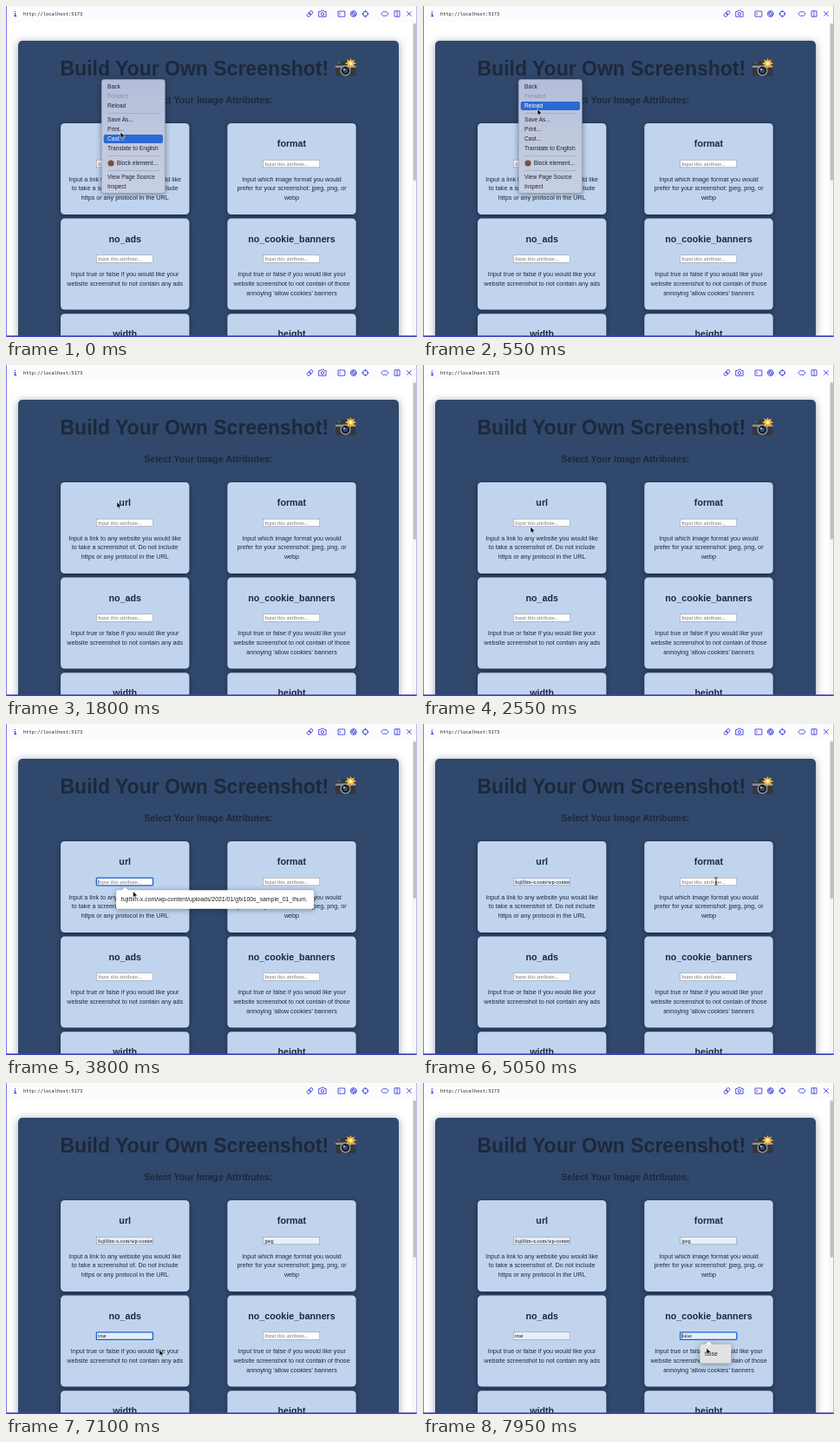
Recreate the animation shown at these times as an HTML page. Size 474x381 px, loop 8 s.

```html
<!DOCTYPE html>
<html lang="en">
<head>
<meta charset="utf-8">
<title>Screenshot builder</title>
<style>
  html, body { margin: 0; width: 100%; height: 100%; overflow: hidden; background: #fff; }
  svg { display: block; width: 474px; height: 381px; }
  text { font-family: "Liberation Sans", Arial, sans-serif; white-space: pre; }
  .mono { font-family: "DejaVu Sans Mono", monospace; font-size: 5.4px; fill: #222; }
  .heading { font-weight: bold; font-size: 10.7px; fill: #1c293b; text-anchor: middle; }
  .body { font-size: 7.2px; fill: #1c293b; text-anchor: middle; }
  .value { font-family: "Liberation Serif", "Times New Roman", serif; font-size: 6.2px; }
  .menu { font-size: 6.67px; }
  .panel { filter: drop-shadow(0 1px 5px #0c1f4466); }
  .card { filter: drop-shadow(0 1px 2.5px #0a142899); }
  .float { filter: drop-shadow(0 1px 3px #0006); }
  .icon { fill: none; stroke: #2b2bd6; stroke-width: .8; }
</style>
</head>
<body>
<svg id="stage" viewBox="0 0 474 381"></svg>
<script>
const LOOP = 8000;
const ROW_STEP = 109.6;
const PLACEHOLDER = 'Input this attribute...';

const cards = [
  { title: 'url', lines: ['Input a link to any website you would like', 'to take a screenshot of. Do not include', 'https or any protocol in the URL'] },
  { title: 'format', lines: ['Input which image format you would', 'prefer for your screenshot: jpeg, png, or', 'webp'] },
  { title: 'no_ads', lines: ['Input true or false if you would like your', 'website screenshot to not contain any ads'] },
  { title: 'no_cookie_banners', lines: ['Input true or false if you would like your', 'website screenshot to not contain of those', "annoying 'allow cookies' banners"] },
  { title: 'width', lines: [] },
  { title: 'height', lines: [] },
].map((card, i) => ({ ...card, x: i % 2 ? 255.3 : 63, y: 135 + Math.floor(i / 2) * ROW_STEP }));

// Times in ms: the field gains focus, shows its suggestion, is filled, loses focus.
const fields = [
  { focus: 2850, open: 3100, fill: 4150, blur: 4700, value: 'fujifilm-x.com/wp-content/uploads/2021/01/gfx100s_sample_01_thum.', popupWidth: 228 },
  { focus: 5150, open: 5300, fill: 5800, blur: 6450, value: 'jpeg', popupWidth: 36 },
  { focus: 6450, open: 6600, fill: 6950, blur: 7350, value: 'true', popupWidth: 36 },
  { focus: 7400, open: 7550, fill: 9000, blur: 9000, value: 'false', popupWidth: 36 },
].map((field, i) => ({ ...field, x: cards[i].x + 41.3, y: cards[i].y + 42 }));

// Cursor stops: [time, x, y]
const stops = [
  [-100, 134, 153], [0, 132, 145], [450, 132, 118.5], [1300, 132, 119],
  [2200, 125, 185], [2550, 124, 186.2], [2800, 128, 182], [3200, 130, 183],
  [3700, 146.5, 192.5], [3850, 146.5, 192.5], [4100, 162, 203], [4250, 162, 203],
  [4900, 338, 181], [5250, 338, 181], [5600, 334, 202], [5850, 334, 202],
  [6250, 134, 287], [6500, 134, 289], [6800, 138, 311], [7000, 138, 311],
  [7350, 331, 291], [7550, 331, 291], [7850, 327, 305], [8000, 327, 305],
];

const menuItems = [
  ['Back', 93], ['Forward', 104], ['Reload', 115], ['Save As...', 131], ['Print...', 142],
  ['Cast...', 153], ['Translate to English', 164], ['Block element...', 181],
  ['View Page Source', 197], ['Inspect', 208],
];

const rect = (x, y, w, h, fill, extra = '') =>
  `<rect x="${x}" y="${y}" width="${w}" height="${h}" fill="${fill}" ${extra}/>`;
const text = (x, y, content, cls, extra = '') =>
  `<text x="${x}" y="${y}" class="${cls}" ${extra}>${content}</text>`;

function cursorAt(time) {
  const i = Math.max(1, stops.findIndex(s => s[0] >= time));
  const [t0, x0, y0] = stops[i - 1], [t1, x1, y1] = stops[i];
  const p = Math.min(1, Math.max(0, (time - t0) / (t1 - t0)));
  const ease = p * p * (3 - 2 * p);
  return { x: x0 + (x1 - x0) * ease, y: y0 + (y1 - y0) * ease };
}

function toolbar() {
  return rect(0, 0, 474, 18, '#fcfcff') + text(20, 10.9, 'http://localhost:5173', 'mono') +
    `<g class="icon">
      <path d="M10.5 6v1M9.5 8.4h1.2v3M9.2 11.6h3" stroke-width="1"/>
      <g transform="rotate(-45 350.5 9)"><rect x="346.5" y="7.2" width="4.6" height="3.6" rx="1.8"/><rect x="349.9" y="7.2" width="4.6" height="3.6" rx="1.8"/></g>
      <path d="M360.7 6.5h2l.9-1.3h2.8l.9 1.3h1.8v5.8h-8.4z"/><circle cx="365" cy="9.2" r="1.7"/>
      <path d="M383 6h7.8v6.2H383zM384.5 7.8l1.3 1.2-1.3 1.2"/>
      <circle cx="400.8" cy="9" r="3.4"/><circle cx="400.8" cy="9" r="1.5"/>
      <path d="M400.8 5.5v2M400.8 10.5v2M397.4 9h2M402.2 9h2M398.4 6.6l1.3 1.3M403.2 11.4l-1.3-1.3"/>
      <circle cx="414.4" cy="9" r="2.9"/><path d="M414.4 4.8v2.5M414.4 10.7v2.5M410.2 9h2.5M416.1 9h2.5"/>
      <path d="M435.6 6l-3 3 3 3 1.3-1.3 1.3 1.3 3-3-3-3-1.3 1.3z"/>
      <path d="M448 5.8h6v6.4h-6zM451 5.8v6.4M462.2 6.2l5.4 5.4M467.6 6.2l-5.4 5.4"/>
    </g>`;
}

function cameraEmoji() {
  return `<g>
    <path d="M380 67.5q0-1.5 1.5-1.5h4l2-3h8l2 3h4.500q1.500 0 1.500 1.500V79q0 1.700-1.700 1.700H381.700Q380 80.700 380 79z" fill="#34383d"/>
    <path d="M380 68.500h23.500v2.500H380z" fill="#8b9195"/><rect x="382" y="64.500" width="4" height="2" fill="#555b60"/>
    <circle cx="391.500" cy="74.500" r="6" fill="#9aa1a5"/><circle cx="391.500" cy="74.500" r="4.700" fill="#16191e"/>
    <circle cx="391.500" cy="74.500" r="2.700" fill="#354f70"/><circle cx="390" cy="73" r="1" fill="#c5d8e8"/>
    <path d="M397.500 60l1.200 3 3.300-1.600-1.100 3.200 3.300 1.400-3.300 1.400 1.100 3.200-3.300-1.600-1.200 3-1.200-3-3.300 1.600 1.100-3.200-3.300-1.400 3.300-1.400-1.100-3.200 3.300 1.600z" fill="#f6b73c"/>
    <circle cx="397.500" cy="66" r="2" fill="#fff3b0"/>
  </g>`;
}

function cardMarkup({ title, lines, x, y }) {
  const center = x + 74.2;
  return rect(x, y, 148.4, 105, '#c1d4ee', 'rx="4.5" class="card"') +
    text(center, y + 27, title, 'heading') +
    lines.map((line, i) => text(center, y + 66.5 + i * 10.75, line, 'body')).join('');
}

const page = rect(0, 0, 474, 381, '#fff') +
  rect(14, 40, 439, 360, '#30486c', 'rx="5" class="panel"') +
  text(64 - 1.5, 80, 'Build Your Own Screenshot!', 'heading', 'style="font-size:23px;text-anchor:start"') +
  cameraEmoji() + text(233.3, 111.7, 'Select Your Image Attributes:', 'heading') +
  cards.map(cardMarkup).join('') + toolbar() +
  rect(468, 18, 6, 363, '#f7f7f8') + rect(469.6, 20, 3.4, 181, '#bfbfc2', 'rx="1.7"');

const frame = rect(0, 379.3, 474, 1.7, '#4141bd') + rect(0, 0, .8, 381, '#5a5ae0') +
  rect(473.4, 0, .6, 381, '#8f8fe0');

const popupShown = (f, t) => t >= f.open && t < f.fill;
const popupBox = f => ({ x: f.x + 22.8, y: f.y + 14.2, w: f.popupWidth, h: 21.6 });
const popupHovered = (f, t, c) => {
  const b = popupBox(f);
  return popupShown(f, t) && c.x > b.x && c.x < b.x + b.w && c.y > b.y + 3 && c.y < b.y + b.h;
};

function fieldMarkup(f, i, t, cursor) {
  const focused = t >= f.focus && t < f.blur;
  const filled = t >= f.fill || popupHovered(f, t, cursor);
  const border = focused ? 'stroke="#1b5fd0" stroke-width="1.3" rx="1"' : 'stroke="#858b94" stroke-width=".5"';
  const caret = focused && t < f.fill ? rect(f.x + 1.6, f.y + 1.7, .5, 6, '#111') : '';
  return rect(f.x, f.y + .2, 65.2, 8.6, filled ? '#e6effd' : '#fff', border) +
    `<clipPath id="clip${i}">${rect(f.x + 1, f.y, 64, 9)}</clipPath>` +
    text(f.x + 1.7, f.y + 6.5, filled ? f.value : PLACEHOLDER, 'value',
      `fill="${filled ? '#111' : '#757575'}" clip-path="url(#clip${i})"`) + caret;
}

function popupMarkup(f, t, cursor) {
  if (!popupShown(f, t)) return '';
  const { x, y, w, h } = popupBox(f);
  const fill = popupHovered(f, t, cursor) ? '#e2e2e3' : '#fff';
  return `<g class="float"><path d="M${x + 6} ${y + .5}l4.2-3.700 4.200 3.700z" fill="#fff"/>` +
    rect(x, y, w, h, fill, 'rx="2"') + '</g>' +
    text(x + 5.7, y + 13, f.value, '', 'font-size="6.95" fill="#222"');
}

function menuMarkup(t) {
  if (t >= 780) return '';
  const pointer = cursorAt(t - 80);
  const items = menuItems.map(([label, y]) => {
    const active = Math.abs(pointer.y - y) <= 5.5;
    const blocker = label.startsWith('Block');
    const color = active ? '#fff' : label === 'Forward' ? '#8b91a8' : '#20242e';
    return (active ? rect(112.7, y - 5, 68.3, 10, '#2d69d3', 'rx="2"') : '') +
      (blocker ? `<circle cx="121" cy="${y}" r="3.6" fill="#79503d"/>` : '') +
      text(blocker ? 127.7 : 117, y + 2.3, label, 'menu', `fill="${color}"`);
  });
  const rules = [123, 172.5, 189].map(y => rect(117, y, 60, .5, '#8f97b2')).join('');
  return rect(110.2, 84.5, 73.2, 131, 'url(#glass)', 'rx="3" stroke="#8791ae" stroke-width=".5" class="float"') +
    rules + items.join('');
}

function cursorMarkup(cursor) {
  const overField = fields.some(f => cursor.x > f.x && cursor.x < f.x + 65.2 && cursor.y >= f.y && cursor.y < f.y + 9);
  const shape = overField
    ? '<path d="M-1.700-4.300Q0-4.300 0-3.300Q0-4.300 1.700-4.300M0-3.300V3.300M-1.700 4.300Q0 4.300 0 3.300Q0 4.300 1.700 4.300M-1 1.300H1" fill="none" stroke="#111" stroke-width=".8"/>'
    : '<path d="M0 0V7.200L1.700 5.600 2.800 8.200 4 7.700 2.900 5.200H5.200Z" fill="#000" stroke="#fff" stroke-width=".6"/>';
  return `<g transform="translate(${cursor.x} ${cursor.y})">${shape}</g>`;
}

const stage = document.getElementById('stage');
stage.innerHTML = `<defs><linearGradient id="glass" x2="0" y2="1">
  <stop stop-color="#b3bdd9"/><stop offset=".5" stop-color="#c0c8de"/><stop offset="1" stop-color="#c6cfe3"/>
  </linearGradient></defs>${page}<g id="live"></g>${frame}`;
const live = document.getElementById('live');

// The lower two inputs lie below the visible area, so only four are drawn.
function draw(now) {
  const t = now % LOOP;
  const cursor = cursorAt(t);
  live.innerHTML = fields.map((f, i) => fieldMarkup(f, i, t, cursor)).join('') +
    fields.map(f => popupMarkup(f, t, cursor)).join('') + menuMarkup(t) + cursorMarkup(cursor);
}

const start = performance.now();
function tick() {
  draw(performance.now() - start);
  requestAnimationFrame(tick);
}
tick();
</script>
</body>
</html>
```
